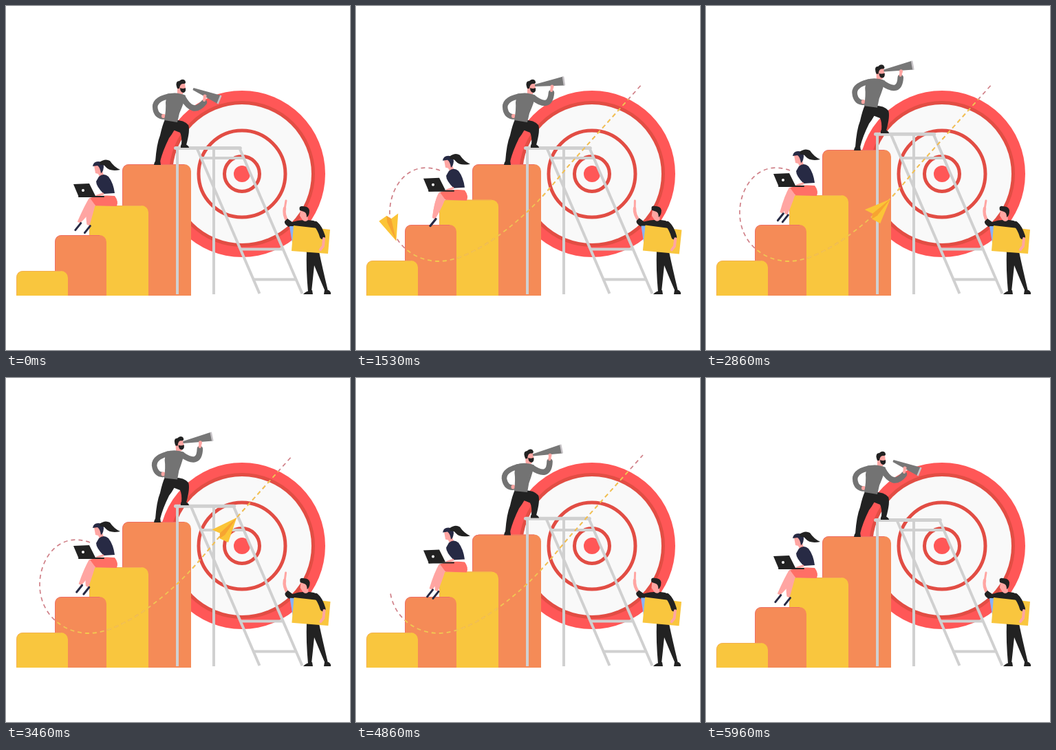
An HTML page with a canvas that plays this animation: 500x500 px, repeating every 5990 ms.

```html
<!DOCTYPE html>
<html lang="en">
<head>
<meta charset="utf-8">
<title>Climbing the steps</title>
<style>
html, body { margin: 0; height: 100%; overflow: hidden; background: #fff; }
canvas { display: block; width: 100vw; height: 100vh; }
</style>
</head>
<body>
<canvas id="stage" width="500" height="500"></canvas>
<script>
const ctx = document.getElementById('stage').getContext('2d');
const LOOP = 5990;
const YELLOW = '#f9c63e', ORANGE = '#f58b57', RED = '#ff5757', DEEP = '#e24d44';
const SKIN = '#ffa5a2', BLACK = '#222', GREY = '#737373', NAVY = '#272a44', STEEL = '#d0d0d0';

const lerp = (a, b, p) => a + (b - a) * p;
const smooth = p => p * p * (3 - 2 * p);
const linear = p => p;

// keys: [time, value] pairs
function track(t, keys, ease = smooth) {
  if (t <= keys[0][0]) return keys[0][1];
  for (let i = 1; i < keys.length; i++) {
    const [t0, a] = keys[i - 1], [t1, b] = keys[i];
    if (t <= t1) return lerp(a, b, ease((t - t0) / (t1 - t0)));
  }
  return keys[keys.length - 1][1];
}
const pulse = (t, up0, up1, down0, down1) =>
  track(t, [[up0, 0], [up1, 1], [down0, 1], [down1, 0]]);

function fill(color, d) {
  ctx.fillStyle = color;
  ctx.fill(new Path2D(d));
}
function line(color, width, d, cap = 'round') {
  ctx.strokeStyle = color;
  ctx.lineWidth = width;
  ctx.lineCap = cap;
  ctx.lineJoin = 'round';
  ctx.stroke(new Path2D(d));
}
function disc(color, x, y, r) {
  ctx.fillStyle = color;
  ctx.beginPath();
  ctx.arc(x, y, r, 0, 7);
  ctx.fill();
}
function ring(color, x, y, r, width) {
  ctx.strokeStyle = color;
  ctx.lineWidth = width;
  ctx.beginPath();
  ctx.arc(x, y, r, 0, 7);
  ctx.stroke();
}
function group(draw, dx = 0, dy = 0, angle = 0, px = 0, py = 0) {
  ctx.save();
  ctx.translate(px + dx, py + dy);
  ctx.rotate(angle);
  ctx.translate(-px, -py);
  draw();
  ctx.restore();
}

function bullseye() {
  const x = 343, y = 244;
  disc(RED, x, y, 121);
  disc(DEEP, x, y, 106);
  disc('#f9f9f9', x, y, 101);
  ring(DEEP, x, y, 63, 5);
  ring(DEEP, x, y, 25.5, 5);
  disc(RED, x, y, 12);
}

function bar(color, x0, x1, top) {
  ctx.fillStyle = color;
  ctx.beginPath();
  ctx.roundRect(x0, top, x1 - x0, 421 - top, [10, 10, 0, 0]);
  ctx.fill();
  const edge = color === ORANGE ? '#ee6f66' : '#f3b052';
  line(edge, 1, `M${x0 + .5} 420V${top + 10}Q${x0 + .5} ${top + .5} ${x0 + 10} ${top + .5}H${x1 - 10}`, 'butt');
}

function ladder(top) {
  const railX = (x, y) => x - (418 - y) * .431;
  for (const x of [249, 302]) line(STEEL, 4, `M${x} ${top}V419`, 'butt');
  for (const x of [368.5, 430.5]) line(STEEL, 4, `M${railX(x, top)} ${top}L${x} 418`, 'butt');
  for (const y of [221, 353.5, 397.5])
    line(STEEL, 4, `M${railX(368.5, y)} ${y}H${railX(430.5, y)}`, 'butt');
  line(STEEL, 5, `M246.5 ${top}H${railX(430.5, top) + 1}`);
}

function climber(lift, lean, raise) {
  group(() => {
    fill(BLACK, 'M231 165L250 168Q245 182 237 192Q228 210 224 226L217 226Q219 200 224 188Q227 174 231 165Z');
    fill(BLACK, 'M238 166Q258 164 265 173Q268 180 262 202L255 201Q256 190 253 184Q246 181 236 178Z');
    fill(BLACK, 'M215 231Q216 222 224 224L225 231Z');
    fill(BLACK, 'M254 206Q253 199 259 200Q266 203 266 206Z');
    group(() => {
      line(GREY, 7.5, 'M237 131Q214 136 217 150Q219 160 228 161');
      disc(SKIN, 229, 160, 3);
      fill(SKIN, 'M249 114L260 112L261 121L257 128L249 128Z');
      fill(GREY, 'M234 128Q248 124 261 130Q259 140 252 156L249 169L230 166Q233 150 232 140Z');
      fill(BLACK, 'M253 119Q257 121 261 119Q262 125 258 126Q253 126 253 119Z');
      fill(BLACK, 'M248 117Q246 109 252 109Q256 105 260 108Q263 113 258 113Q253 112 252 120L249 120Z');

      const mix = (a, b) => lerp(a, b, raise);
      const nx = mix(272, 260), ny = mix(120.5, 115.5);
      const wx = mix(310, 302), wy = mix(136, 109);
      const hx = mix(288, 284), hy = mix(137, 123);
      line(GREY, 8.5, `M257 133Q${mix(272, 282)} ${mix(160, 152)} ${hx} ${hy + 3}`);
      line(SKIN, 4, `M${hx} ${hy}L${hx + 1} ${hy - 5}`);
      group(() => {
        const len = Math.hypot(wx - nx, wy - ny);
        fill('#777', `M0 -1.5L${len} -6.5V6.5L0 1.5Z`);
        line('#c8c4c8', 2.5, `M${len} -6.5V6.5`, 'butt');
      }, nx, ny, Math.atan2(wy - ny, wx - nx));
      disc(SKIN, hx + 1, hy - 6, 2.5);
    }, 0, 0, -.14 * lean, 240, 168);
  }, 0, -lift);
}

function sitter(lift, swing) {
  group(() => {
    const leg = (x, y) => {
      fill(SKIN, `M121 279L132 281Q128 296 ${x + 3} ${y - 5}L${x - 1} ${y - 7}Q114 290 121 279Z`);
      line(NAVY, 3, `M${x + 4} ${y - 5}L${x - 4} ${y + 5}`);
    };
    leg(112 + 8 * swing, 323 + 2 * swing);
    leg(112 - 9 * swing, 323 - 3 * swing);
    fill('#ff6f66', 'M122 279Q138 274 158 276Q164 284 161 291L130 290Z');
    fill(SKIN, 'M128 232L137 232L143 248L136 248L134 244L130 243Z');
    fill(NAVY, 'M135 248Q142 242 149 248Q156 257 158 272L142 273Q131 262 131 255Z');
    line(SKIN, 3, 'M141 273L132 276');
    fill(NAVY, 'M126 233Q127 226 134 226Q142 226 142 234Q141 242 138 243Q137 235 133 232Z');
    fill(BLACK, 'M136 227Q144 221 151 225Q157 234 166 238Q151 241 145 234Q142 230 137 231Z');
    fill(BLACK, 'M98 259L121 258L130 276L106 278Z');
    line(BLACK, 2, 'M106 277L142 277');
    disc('#fff', 112, 268, 2);
  }, 0, -lift);
}

function carrier(sway) {
  fill(BLACK, 'M437 356L455 357Q460 381 468 414L464 415Q455 394 448 377Q446 397 444 415L439 415Q436 382 437 356Z');
  fill(BLACK, 'M432 419Q436 414 445 413L446 419Z');
  fill(BLACK, 'M462 419L463 413L469 413Q473 416 472 419Z');
  group(() => {
    group(() => {
      line(SKIN, 4.5, 'M409 313Q403 303 405 294');
      line(SKIN, 3, 'M405 295L407 283');
    }, 0, 0, -.16 * sway, 409, 313);
    fill(BLACK, 'M409 309L416 314Q430 309 447 312Q457 315 461 328L463 358L437 358Q429 338 428 321L411 321Q404 317 405 313Z');
    fill(SKIN, 'M428 296L438 296L439 311Q435 315 431 311L427 305Z');
    fill(BLACK, 'M427 297Q425 290 431 291Q440 291 441 297Q441 305 437 307Q437 300 433 299Z');
    fill('#86b3ff', 'M412 320L419 320L418 356Z');
    fill(YELLOW, 'M418 319L471 325L468 360L415 356Z');
    line(BLACK, 8, 'M450 317Q456 322 460 335');
    line(SKIN, 4, 'M462 338L461 349L457 354');
  }, 1.8 * sway, 0, .018 * sway, 447, 360);
}

const ROUTE = 'M122 239C75 222 49 265 49 300C49 345 85 371 120 371C150 371 185 350 208 333C260 295 285 260 310 231L417 112';
const route = document.createElementNS('http://www.w3.org/2000/svg', 'path');
route.setAttribute('d', ROUTE);
const routeLen = route.getTotalLength();

function trail(from, to) {
  if (to - from < 1) return;
  const dashes = [0, from];
  for (let s = from; s < to; s += 11) dashes.push(Math.min(6, to - s), 5);
  dashes[dashes.length - 1] = 9999;
  ctx.save();
  ctx.setLineDash(dashes);
  line('#d08088', 1.7, ROUTE, 'butt');
  // the dashes turn yellow over the bars and the rings
  const clip = new Path2D();
  clip.rect(71, 318, 198, 103);
  clip.rect(169, 230, 100, 100);
  clip.moveTo(464, 244);
  clip.arc(343, 244, 121, 0, 7);
  ctx.clip(clip);
  line('#f5c84c', 1.8, ROUTE, 'butt');
  ctx.restore();
}

function plane(s, size) {
  if (size <= 0) return;
  const p = route.getPointAtLength(s);
  const a = route.getPointAtLength(Math.max(0, s - 3));
  const b = route.getPointAtLength(Math.min(routeLen, s + 3));
  group(() => {
    ctx.scale(size, size);
    fill('#fbc437', 'M19 0L-18 -15L-14 -3L-20 2L-16 15Z');
    fill('#f7a431', 'M19 0L-14 -3L-20 2L-11 4Z');
  }, p.x, p.y, Math.atan2(b.y - a.y, b.x - a.x));
}

function draw(t) {
  ctx.clearRect(0, 0, 500, 500);
  const rise = [
    15 * pulse(t, 100, 900, 5270, 5950),
    15 * pulse(t, 400, 1300, 4900, 5700),
    15 * pulse(t, 1100, 1900, 4500, 5300),
    21 * pulse(t, 1530, 2500, 4150, 5050)
  ];
  const lean = track(t, [[100, 0], [850, 1], [1200, 1], [1500, 0], [2300, 0], [3300, .35],
    [3600, .35], [4350, 0], [4600, 0], [5200, 1], [5380, 1], [5950, 0]]);
  const raise = pulse(t, 30, 700, 5380, 5950);
  const swing = track(t, [[0, .8], [600, 1], [1530, 0], [2260, .1], [3300, .6],
    [3500, .6], [4400, 0], [5330, 1], [LOOP, .8]]);
  const sway = (1 - Math.cos(t / LOOP * 4 * Math.PI)) / 2;

  bullseye();
  bar(ORANGE, 169, 269, 230 - rise[3]);
  bar(YELLOW, 121, 207, 290 - rise[2]);
  bar(ORANGE, 71, 146, 333 - rise[1]);
  bar(YELLOW, 15, 90, 385 - rise[0]);
  ladder(206.5 - .96 * rise[3]);

  const erased = track(t, [[4500, 0], [5950, 1]], p => p ** 1.15);
  const drawn = track(t, [[200, 0], [1450, 1]]);
  trail(erased * routeLen, drawn * routeLen);

  climber(rise[3], lean, raise);
  sitter(rise[2], swing);
  carrier(sway);
  plane(track(t, [[800, 0], [1530, 137], [2260, 280], [3460, 486], [4200, routeLen]], linear),
    pulse(t, 800, 1000, 4000, 4220));
}

function frame(now) {
  draw(now % LOOP);
  requestAnimationFrame(frame);
}
requestAnimationFrame(frame);
</script>
</body>
</html>
```
